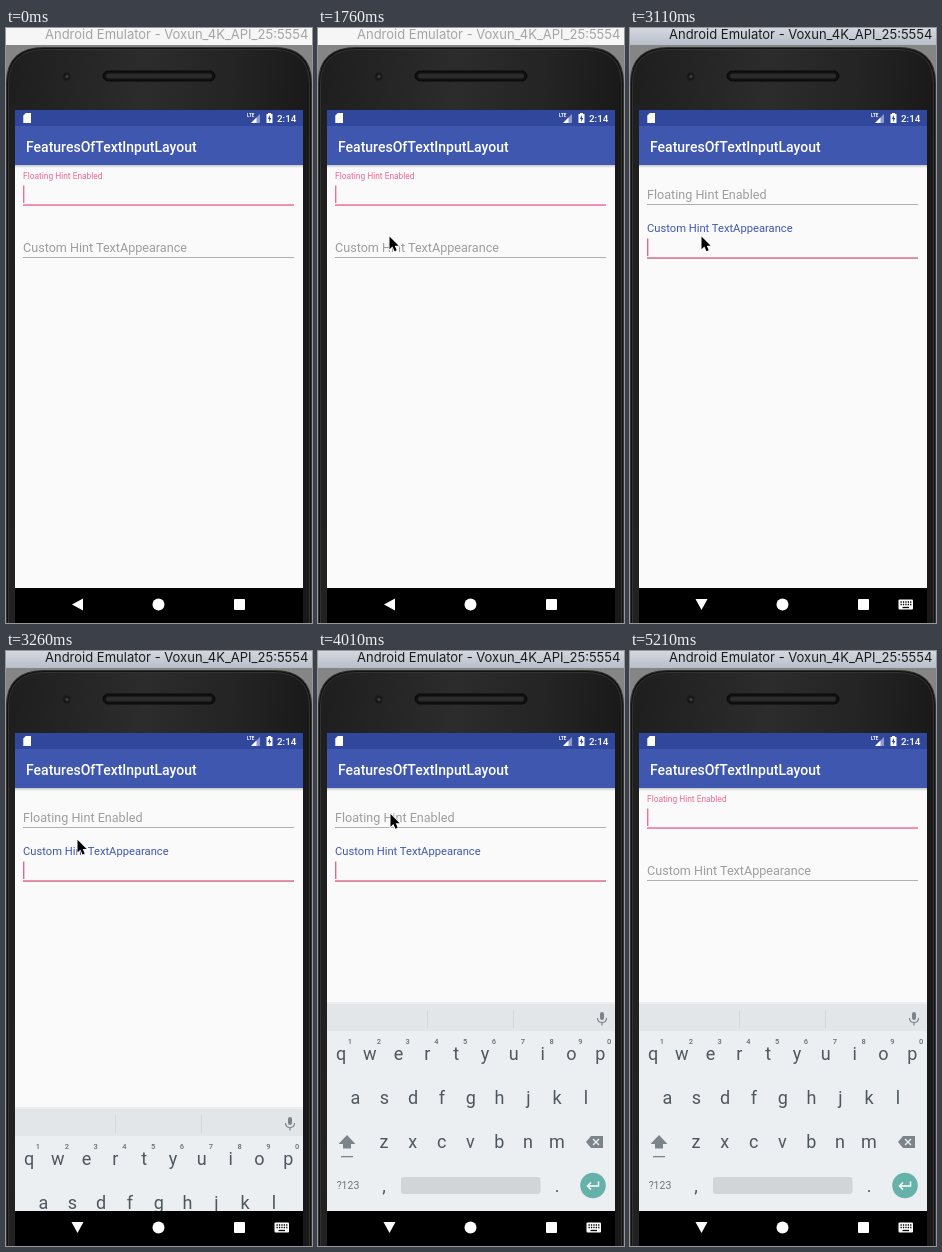
An HTML page that plays this animation: 306 px wide and 595 px high, repeating every 5350 ms.

```html
<!DOCTYPE html>
<html lang="en">
<head>
<meta charset="utf-8">
<title>Floating hints</title>
<style>
  html, body { margin: 0; width: 100%; height: 100%; overflow: hidden; background: #1c1c1c; }
  svg { display: block; width: 306px; height: 595px; font-family: Roboto, sans-serif; }
  .title { font: 13px Inter, sans-serif; }
  .white { fill: #fff; }
  .keys { fill: #4d575d; font-size: 18px; text-anchor: middle; }
  .keys .digit { font-size: 7.5px; font-weight: 500; fill: #646d72; }
  .keys .mode { font-size: 10.5px; fill: #6b7479; }
  .icon { fill: #7b8489; }
</style>
</head>
<body>
<svg viewBox="0 0 306 595">
  <defs>
    <linearGradient id="bar" x2="0" y2="1">
      <stop stop-color="#d3d7df"/><stop offset="1" stop-color="#b9bfca"/>
    </linearGradient>
    <linearGradient id="body" x2="1" y2=".12">
      <stop stop-color="#1e1e1e"/><stop offset=".45" stop-color="#2c2c2c"/>
      <stop offset=".75" stop-color="#242424"/><stop offset="1" stop-color="#191919"/>
    </linearGradient>
    <linearGradient id="shade" x2="0" y2="1">
      <stop stop-color="#000" stop-opacity=".22"/><stop offset="1" stop-color="#000" stop-opacity="0"/>
    </linearGradient>
    <clipPath id="screen"><rect x="9" y="82" width="288" height="478"/></clipPath>
  </defs>

  <!-- window and phone -->
  <rect y="17" width="306" height="578" fill="#858585"/>
  <path d="M.5 600V55Q.5 19.500 38 19.500H268Q305.500 19.500 305.500 55V600Z" fill="#111" stroke="#343434"/>
  <path d="M2.500 600V56Q2.500 21.500 39 21.500H267Q303.500 21.500 303.500 56V600Z" fill="url(#body)" stroke="#333"/>
  <rect x="97" y="43" width="112" height="10" rx="5" fill="#101010" stroke="#090909"/>
  <rect x="100" y="45.500" width="106" height="5" rx="2.500" fill="#2b2b2b"/>
  <circle cx="60.500" cy="48.500" r="4" fill="#181818"/>
  <circle cx="61" cy="48.500" r="1.500" fill="#414141"/>
  <rect id="bar-bg" width="306" height="17"/>
  <text id="bar-text" class="title" x="39" y="10.500">Android Emulator - Voxun_4K_API_25:5554</text>

  <g clip-path="url(#screen)">
    <rect x="9" y="82" width="288" height="478" fill="#fafafa"/>
    <rect x="9" y="137" width="288" height="3" fill="url(#shade)"/>
    <rect x="9" y="98" width="288" height="39" fill="#3f57ae"/>
    <rect x="9" y="82" width="288" height="16" fill="#31479c"/>
    <g class="white">
      <path d="M19.800 85H25V95H17.300V87.500Z"/>
      <path d="M254 86V95H245Z" opacity=".45"/><path d="M250.500 89.500V95H245Z"/>
      <text x="241" y="88.500" font-size="4.500" font-weight="700">LTE</text>
      <path d="M260.500 86H262V85H265V86H266.500V95H260.500Z"/>
      <path d="M264 87L261.800 91H263.200V94L265.300 90H264Z" fill="#31479c"/>
      <text x="271" y="94" font-size="9.800" font-weight="500">2:14</text>
      <text x="20" y="123.500" font-size="14" font-weight="500">FeaturesOfTextInputLayout</text>
    </g>

    <g id="fields"></g>

    <g id="keyboard">
      <rect x="9" y="351" width="288" height="2" fill="#000" opacity=".05"/>
      <rect x="9" y="353" width="288" height="207" fill="#eceff2"/>
      <rect x="9" y="353" width="288" height="27" fill="#e2e6e9"/>
      <path d="M109.500 359V377M195.500 359V377" stroke="#d3d8db"/>
      <g class="icon">
        <rect x="282" y="361" width="4" height="8" rx="2"/>
        <path d="M279.500 367Q279.500 371.500 284 371.500T288.500 367M284 371.500V374.500" fill="none" stroke="#7b8489" stroke-width="1.200"/>
        <path d="M29 484L37.500 493H33V497.500H25V493H20.500Z"/>
        <rect x="23" y="505" width="12" height="1.300"/>
        <path d="M273 485H285V497H273L268 491Z"/>
        <path d="M275 488L281 494M281 488L275 494" stroke="#eceff2" stroke-width="1.400"/>
      </g>
      <rect x="83" y="526" width="139.500" height="17" rx="3" fill="#d1d5d8"/>
      <circle cx="275" cy="534.500" r="12.800" fill="#66b2aa"/>
      <path d="M280.500 530.500V535H270M273 531.500L269.500 535L273 538.500" fill="none" stroke="#fff" stroke-width="1.500"/>
      <g id="keys" class="keys"></g>
    </g>
  </g>

  <!-- navigation bar -->
  <rect x="9" y="560" width="288" height="35" fill="#000"/>
  <g class="white">
    <path id="back" d="M66 576.500L77 570.500V582.500Z"/>
    <circle cx="152.500" cy="576.500" r="6"/>
    <rect x="228" y="571" width="11" height="11" rx="1"/>
    <g id="ime">
      <rect x="268.500" y="571.500" width="14.500" height="10" rx="1"/>
      <path d="M270.500 574H281.500M270.500 576.500H281.500" stroke="#000" stroke-width="1.300" stroke-dasharray="1.300 1.100"/>
      <path d="M272.500 579.500H279" stroke="#000" stroke-width="1.300"/>
    </g>
  </g>
  <path id="mouse" d="M0 0V12.800L2.900 10L5 14.800L7.200 13.800L5.200 9.200H9.200Z" fill="#000" stroke="#fff" stroke-width="1.400" paint-order="stroke"/>
</svg>
<script>
const LOOP = 5350, STEP = 150, START = 260;
const $ = id => document.getElementById(id);
const clamp = x => Math.min(1, Math.max(0, x));
const mix = (a, b, p) => a + (b - a) * p;
const ease = p => p * p * (3 - 2 * p);
const span = (t, a, b) => ease(clamp((t - a) / (b - a)));

function add(parent, tag, attrs, text = '') {
  const el = document.createElementNS('http://www.w3.org/2000/svg', tag);
  set(el, attrs);
  el.textContent = text;
  return parent.appendChild(el);
}
function set(el, attrs) {
  for (const k in attrs) el.setAttribute(k, attrs[k]);
}
const show = (el, on) => set(el, { visibility: on ? 'visible' : 'hidden' });

// Keyboard letters
const PITCH = 28.8;
function row(chars, x, y, cls = '') {
  [...chars].forEach((c, i) => add($('keys'), 'text', { x: x + i * PITCH, y, class: cls }, c));
}
row('qwertyuiop', 23, 409);
row('1234567890', 32, 393, 'digit');
row('asdfghjkl', 37.5, 453);
row('zxcvbnm', 66, 497);
row(',', 66, 541);
row('.', 239, 541);
add($('keys'), 'text', { x: 30, y: 538, class: 'mode' }, '?123');

// Text fields: rest and floated values for baseline and size
function field(text, y, floatY, floatSize, tint, line, lineY) {
  const g = $('fields');
  return {
    y, floatY, floatSize, tint, line, lineY,
    hint: add(g, 'text', { x: 17 }, text),
    rule: add(g, 'rect', { x: 17, width: 271 }),
    caret: add(g, 'rect', { x: 17, y: lineY - 18.5, width: 1.4, height: 17.5, fill: line })
  };
}
const GREY = [158, 158, 158];
const first = field('Floating Hint Enabled', 170.5, 151, 8.4, [238, 104, 148], '#ee6f9b', 176);
const second = field('Custom Hint TextAppearance', 223.5, 204, 11.2, [63, 87, 176], '#dc6c8b', 229);

function drawField(f, p, focused, caretOn) {
  const rgb = GREY.map((c, i) => Math.round(mix(c, f.tint[i], p)));
  set(f.hint, {
    y: mix(f.y, f.floatY, p),
    'font-size': mix(12.6, f.floatSize, p),
    fill: `rgb(${rgb})`
  });
  set(f.rule, {
    y: focused ? f.lineY + 0.3 : f.lineY,
    height: focused ? 1.5 : 1,
    fill: focused ? f.line : '#b0b0b0'
  });
  show(f.caret, focused && caretOn);
}

// Pointer: [time, x, y], eased between stops
const path = [
  [260, 180, 299], [1310, 71.5, 208.5], [3110, 71.5, 208.5], [3410, 71.5, 169],
  [3710, 72.5, 163], [4460, 72.5, 163], [4610, 96, 409]
];
function pointer(t) {
  const i = Math.max(1, path.findIndex(s => s[0] >= t));
  const [a, b] = [path[i - 1], path[i]];
  const p = span(t, a[0], b[0]);
  return [mix(a[1], b[1], p), mix(a[2], b[2], p)];
}

const blinks = [260, 710, 1310, 1760, 2360, 2810, 3410, 3860, 4760, 5210];
const DOWN = 2860, UP = 4210;

function render(t) {
  const active = t >= 2060;
  set($('bar-bg'), { fill: active ? 'url(#bar)' : '#f6f6f6' });
  set($('bar-text'), { fill: active ? '#1c1c1c' : '#a5a5a5' });

  const lower = t >= DOWN && t < UP;
  const caretOn = blinks.filter(b => b <= t).length % 2 === 0;
  const p = span(t, DOWN, DOWN + 200) - span(t, UP, UP + 200);
  drawField(first, 1 - p, !lower, caretOn);
  drawField(second, p, lower, caretOn);

  const rise = span(t, 3110, 3410);
  show($('keyboard'), rise > 0);
  set($('keyboard'), { transform: `translate(0 ${210 * (1 - rise)})` });
  const ime = t >= 3110;
  show($('ime'), ime);
  set($('back'), { transform: ime ? 'rotate(-90 71.5 576.5)' : '' });

  const visible = t >= START && t <= 4610;
  show($('mouse'), visible);
  if (visible) set($('mouse'), { transform: `translate(${pointer(t)})` });
}

function tick() {
  const t = performance.now() % LOOP;
  render(t < 270 ? 0 : START + Math.floor((t - START) / STEP) * STEP);
  requestAnimationFrame(tick);
}
tick();
</script>
</body>
</html>
```
